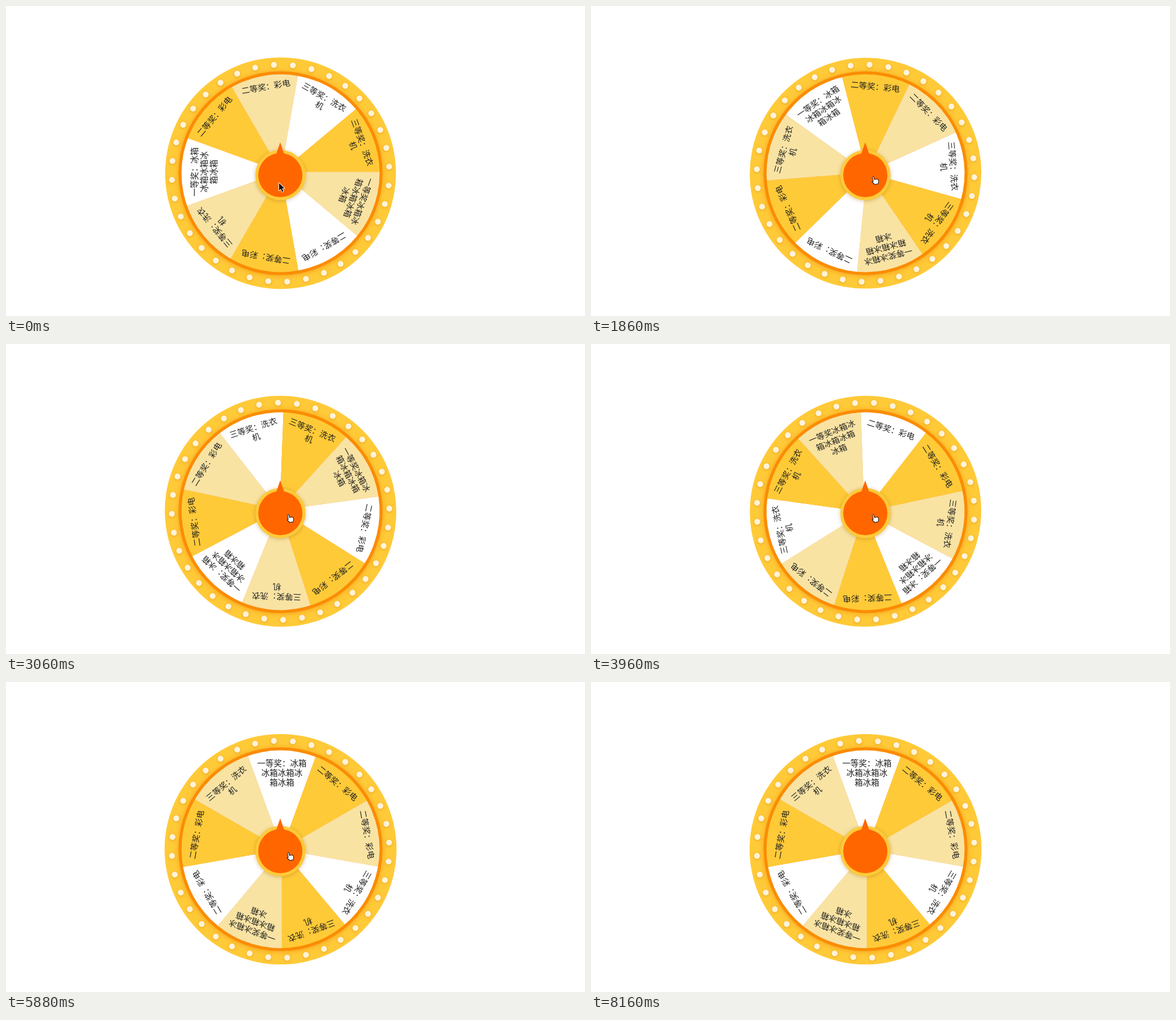
An HTML page with a canvas for the animation above (8.7 s loop, 1022 by 548 pixels).

```html
<!DOCTYPE html>
<html lang="zh-CN">
<head>
<meta charset="utf-8">
<title>Prize wheel</title>
<style>
  html, body { margin: 0; width: 100%; height: 100%; overflow: hidden; background: #fff; }
  canvas { display: block; }
</style>
</head>
<body>
<canvas id="stage" width="1022" height="548"></canvas>
<script>
const ctx = document.getElementById('stage').getContext('2d');
const LOOP = 8700, STEP = 60, LAST = 8160;
const RAD = Math.PI / 180;
const GOLD = '#ffca38', PALE = '#f9e3a3', ORANGE = '#ff6600';
const CENTER = { x: 484.6, y: 295.6 };

const WASHER = ['三等奖：洗衣', '机'];
const TV = ['二等奖：彩电'];
const PRIZES = [
  ['一等奖：冰箱', '冰箱冰箱冰', '箱冰箱'],
  TV, TV, WASHER, WASHER,
  ['一等奖冰箱冰', '箱冰箱冰箱', '冰箱'],
  TV, TV, WASHER
];
const SECTOR_COLORS = ['#fff', GOLD, PALE];

// Pointer waypoints: time, x, y
const PATH = [
  [0, 482, 313], [420, 200, 455], [900, 500, 304], [6300, 500, 304],
  [7200, 937, 3], [8100, 191, 523]
];
const ARROW = [[0, 0], [0, 13], [3, 10.3], [5.3, 15.4], [7.6, 14.4], [5.3, 9.4], [9.3, 9.2]];

// Spin up, then slow down, as two power curves that meet at speed
const SPIN = { start: 1272, peak: 3000, end: 5485, up: 947, down: 1663 };
function wheelAngle(t) {
  const { start, peak, end, up, down } = SPIN;
  if (t < start) return -90;
  if (t < peak) return -90 + up * ((t - start) / (peak - start)) ** 2.63;
  return t < end ? -down * ((end - t) / (end - peak)) ** 2.15 : 0;
}

function disc(x, y, rx, color, ry = rx) {
  ctx.fillStyle = color;
  ctx.beginPath();
  ctx.ellipse(x, y, rx, ry, 0, 0, 2 * Math.PI);
  ctx.fill();
}

function shadow(color, blur, dy = 0) {
  ctx.shadowColor = color;
  ctx.shadowBlur = blur;
  ctx.shadowOffsetY = dy;
}

function polygon(points) {
  ctx.beginPath();
  points.forEach(([x, y]) => ctx.lineTo(x, y));
  ctx.closePath();
}

function drawSector(lines, i) {
  ctx.save();
  ctx.rotate(i * 40 * RAD);
  ctx.fillStyle = SECTOR_COLORS[i % 3];
  ctx.beginPath();
  ctx.moveTo(0, 0);
  ctx.arc(0, 0, 185, -110 * RAD, -70 * RAD);
  ctx.fill();
  ctx.fillStyle = '#222';
  lines.forEach((line, row) => ctx.fillText(line, 0, -153 + row * 17));
  ctx.restore();
}

function drawWheel(angle) {
  ctx.save();
  ctx.translate(CENTER.x, CENTER.y);
  ctx.rotate(angle * RAD);
  disc(0, 0, 204.7, GOLD, 203.7);

  shadow('rgba(214,138,20,.6)', 4, 1);
  for (let a = 6.5; a < 360; a += 10) {
    disc(192 * Math.sin(a * RAD), -192 * Math.cos(a * RAD), 5.2, '#fff3d8');
  }
  shadow('rgba(235,130,0,.6)', 8, 1);
  disc(0, 0, 180, '#fb8c04');
  shadow('transparent', 0);

  ctx.beginPath();
  ctx.arc(0, 0, 174.8, 0, 2 * Math.PI);
  ctx.clip();
  ctx.translate(2.3, 0.6);
  ctx.font = '500 14.5px "Noto Sans CJK SC", "Noto Sans CJK", sans-serif';
  ctx.textAlign = 'center';
  ctx.textBaseline = 'middle';
  PRIZES.forEach(drawSector);
  ctx.restore();
}

function drawButton() {
  shadow('rgba(150,100,20,.4)', 7, 1);
  disc(484.4, 299, 44.3, GOLD);
  shadow('transparent', 0);
  disc(484.2, 299, 39, ORANGE);
  polygon([[484, 241], [491.5, 263], [476.5, 263]]);
  ctx.fill();
}

function drawHand() {
  ctx.rotate(-12 * RAD);
  ctx.beginPath();
  ctx.moveTo(-3, 6);
  ctx.lineTo(-3, -1.5);
  ctx.arc(-1.7, -1.5, 1.3, Math.PI, 0);
  ctx.lineTo(-0.4, 2.5);
  ctx.quadraticCurveTo(6.5, 2.3, 6.4, 5.5);
  ctx.quadraticCurveTo(6.4, 9, 4.8, 11.5);
  ctx.lineTo(-1.5, 11.5);
  ctx.quadraticCurveTo(-3, 8.6, -5.3, 6.6);
  ctx.quadraticCurveTo(-5, 4.4, -3, 6);
  ctx.fillStyle = '#fff';
  ctx.strokeStyle = '#111';
  ctx.fill();
  ctx.stroke();
}

function drawArrow() {
  polygon(ARROW);
  ctx.strokeStyle = '#fff';
  ctx.lineWidth = 2;
  ctx.stroke();
  ctx.fillStyle = '#111';
  ctx.fill();
}

function drawCursor(t) {
  if (t >= LAST) return;
  const next = PATH.findIndex(p => p[0] > t);
  const b = PATH[next < 0 ? PATH.length - 1 : next];
  const a = next < 0 ? b : PATH[next - 1];
  const p = a === b ? 0 : (t - a[0]) / (b[0] - a[0]);
  const k = p * p * (3 - 2 * p);
  ctx.save();
  ctx.translate(a[1] + (b[1] - a[1]) * k, a[2] + (b[2] - a[2]) * k);
  ctx.lineWidth = 1;
  ctx.lineJoin = 'round';
  if (t >= 900 && t <= 6300) drawHand();
  else drawArrow();
  ctx.restore();
}

function render(now) {
  const t = Math.min(LAST, Math.floor((now % LOOP) / STEP) * STEP);
  ctx.fillStyle = '#fff';
  ctx.fillRect(0, 0, 1022, 548);
  drawWheel(wheelAngle(t));
  drawButton();
  drawCursor(t);
}

let begin;
function tick(now) {
  begin ??= now;
  render(now - begin);
  requestAnimationFrame(tick);
}
render(0);
requestAnimationFrame(tick);
</script>
</body>
</html>
```
